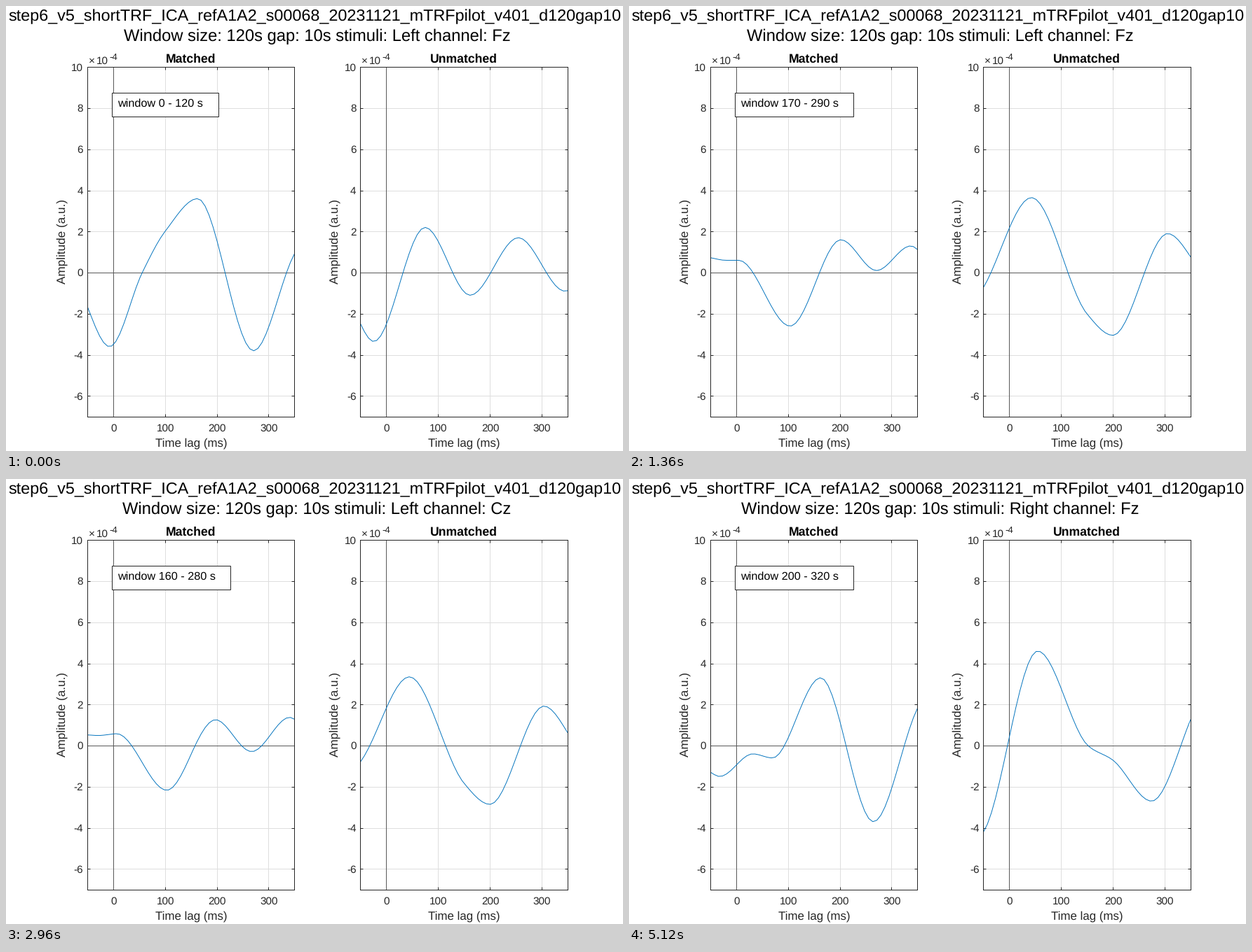
A matplotlib script for the animation above (6.72 s loop, 880 px wide and 636 px high).

```python
import numpy as np
import matplotlib.pyplot as plt
from matplotlib.animation import FuncAnimation
from matplotlib.patches import Rectangle

W, H, DPI = 880, 636, 100
TOP, BOTTOM = 87.2, 586.8
LEFTS, SPAN = (116, 505.4), 295.4
INK, BLUE = "#262626", "#0072BD"
FRAMES, STEP_MS = 84, 80

plt.rcParams["font.family"] = "Liberation Sans"
plt.rcParams["text.hinting"] = "none"
plt.rcParams["axes.unicode_minus"] = False

fig = plt.figure(figsize=(W / DPI, H / DPI), dpi=DPI, facecolor="white")
LAG = np.linspace(-50, 350, 52)


def pt(px):
    return px * 72 / DPI


def put(x, y, text, size, ha="center", color=INK, **kw):
    """Text by baseline, in pixels from the top left corner."""
    return fig.text(x / W, 1 - y / H, text, fontsize=pt(size), ha=ha,
                    va="baseline", color=color, **kw)


def wave(*points):
    """Smooth curve, flat at its turning points and at both ends."""
    t, y = np.array(points, float).T
    rise = np.diff(y) / np.diff(t)
    a, b = rise[:-1], rise[1:]
    slope = np.zeros(len(t))
    same = a * b > 0
    slope[1:-1][same] = 2 * a[same] * b[same] / (a + b)[same]

    k = np.searchsorted(t, LAG, "right") - 1
    step = t[k + 1] - t[k]
    f = (LAG - t[k]) / step
    ease = f * f * (3 - 2 * f)
    lean = f * (1 - f) * ((1 - f) * slope[k] - f * slope[k + 1])
    return y[k] + (y[k + 1] - y[k]) * ease + step * lean


# Each response pairs the matched and the unmatched curve, given by its
# turning points and the few shoulders between them.
fz_start = np.array([
    wave((-85, -.2), (-7, -3.6), (56, 0), (100, 2), (163, 3.6),
         (271, -3.8), (366, 1.3)),
    wave((-85, -1.1), (-24, -3.35), (75, 2.2), (162, -1.1), (255, 1.7),
         (345, -.9), (400, 0))])
cz_start = np.array([
    wave((-85, -.5), (-8, -3.2), (52, 0), (100, 2.05), (163, 3.8),
         (274, -4.1), (368, 1.1)),
    wave((-55, -2.4), (64, 2.1), (173, -1.5), (262, 1.4), (344, -1),
         (400, -.6))])
deep = np.array([
    wave((-50, -.7), (45, 1.4), (106, .3), (159, 1.55), (250, -5.5),
         (355, 4.5)),
    wave((-85, -1.9), (-33, -3.15), (62, 1.5), (134, -.2), (183, .15),
         (212, .1), (296, 1.7), (390, -1.9))])
fading = np.array([
    wave((-100, -1.6), (47, .95), (92, .8), (150, 1.3), (250, -3.5),
         (362, 2.6)),
    wave((-70, -1), (-35, -1.45), (60, 1.45), (100, .8), (202, -1.5),
         (296, 2.2), (395, -2.2))])
turned = np.array([
    wave((-60, .75), (-20, .6), (5, .6), (104, -2.6), (202, 1.6),
         (271, .1), (337, 1.3), (380, .5)),
    wave((-75, -1.3), (43, 3.65), (150, -2), (200, -3.05), (306, 1.9),
         (390, -.2))])
late = np.array([
    wave((-85, -1.5), (3, 1.4), (86, -2.4), (171, 1.8), (243, -.45),
         (315, 1.5), (390, -.9)),
    wave((-100, -.8), (0, 1), (64, 1.75), (189, -2.1), (287, .2),
         (313, .15), (380, 1.15))])
right_late = np.array([
    wave((-60, -1.2), (-32, -1.5), (32, -.4), (70, -.6), (163, 3.3),
         (265, -3.7), (368, 2.3)),
    wave((-60, -4.4), (55, 4.6), (152, 0), (200, -.7), (275, -2.7),
         (385, 2.5))])


def response(side, channel, start):
    """Blend of the key responses around a window start."""
    first = fz_start if channel == "Fz" else cz_start
    if side == "Left":
        keys = {0: first, 70: deep, 90: fading, 170: turned, 200: late}
    else:
        keys = {0: first, 200: right_late}
    return sum(np.interp(start, list(keys), row) * shape
               for row, shape in zip(np.eye(len(keys)), keys.values()))


def scene(i):
    """Side, channel and window start of a frame."""
    if i < 42:
        return "Left", ("Fz", "Cz")[i // 21], i % 21 * 10
    if i == 42:
        return "Right", "Fz", 0
    if i < 63:
        return "Left", "Cz", 200
    if i == 63:
        return "Right", "Cz", 0
    return "Right", "Fz", 200


def panel(left, title):
    ax = fig.add_axes([left / W, 1 - BOTTOM / H, SPAN / W, (BOTTOM - TOP) / H])
    ax.set(xlim=(-50, 350), ylim=(-7, 10),
           xticks=range(0, 301, 100), yticks=range(-6, 11, 2))
    ax.set_axisbelow(True)
    ax.grid(color="#dedede", lw=pt(1))
    ax.tick_params(direction="in", length=pt(4), width=pt(1), color=INK,
                   top=True, right=True, labelbottom=False, labelleft=False)
    for spine in ax.spines.values():
        spine.set(color=INK, lw=pt(1))
    ax.axhline(0, color="#595959", lw=pt(1), zorder=1.5)
    ax.axvline(0, color="#595959", lw=pt(1), zorder=1.5)

    for v in range(0, 301, 100):
        put(left + .5 + (v + 50) / 400 * SPAN, 607.5, str(v), 15.3)
    for v in range(-6, 11, 2):
        y = TOP + (10 - v) / 17 * (BOTTOM - TOP)
        put(left - 6, y + 5.2, str(v), 15.3, ha="right")
    put(left + 1.5, 82.5, "×", 15.3, ha="left")
    put(left + 12.5, 82.5, "10", 15.3, ha="left")
    put(left + 31, 77, "-4", 13.3, ha="left")
    put(left + SPAN / 2 + .3, 81, title, 17.6, color="black", weight="bold")
    put(left + SPAN / 2 + .3, 629, "Time lag (ms)", 16.9)
    put(left - 32, 337, "Amplitude (a.u.)", 17.1, rotation=90,
        rotation_mode="anchor")
    return ax.plot(LAG, 0 * LAG, color=BLUE, lw=pt(.95))[0]


lines = [panel(x, name) for x, name in zip(LEFTS, ("Matched", "Unmatched"))]
put(440, 21, "step6_v5_shortTRF_ICA_refA1A2_s00068_20231121"
    "_mTRFpilot_v401_d120gap10", 23.35, color="black")
heading = put(443.5, 50, "", 23.8, color="black")

box = Rectangle((151, H - 158), 152, 34, transform=None, fc="white",
                ec=INK, lw=pt(1), zorder=5)
fig.add_artist(box)
note = put(159.5, 143.5, "", 16.2, ha="left", color="black", zorder=6)


def draw(i):
    side, channel, start = scene(i)
    for line, y in zip(lines, response(side, channel, start)):
        line.set_ydata(y)
    heading.set_text(
        f"Window size: 120s gap: 10s stimuli: {side} channel: {channel}")
    note.set_text(f"window {start} - {start + 120} s")
    box.set_width(152 + 8.6 * (len(str(start)) - 1))
    return [*lines, heading, box, note]


anim = FuncAnimation(fig, draw, frames=FRAMES, interval=STEP_MS,
                     repeat=True, repeat_delay=0)
plt.show()
```
